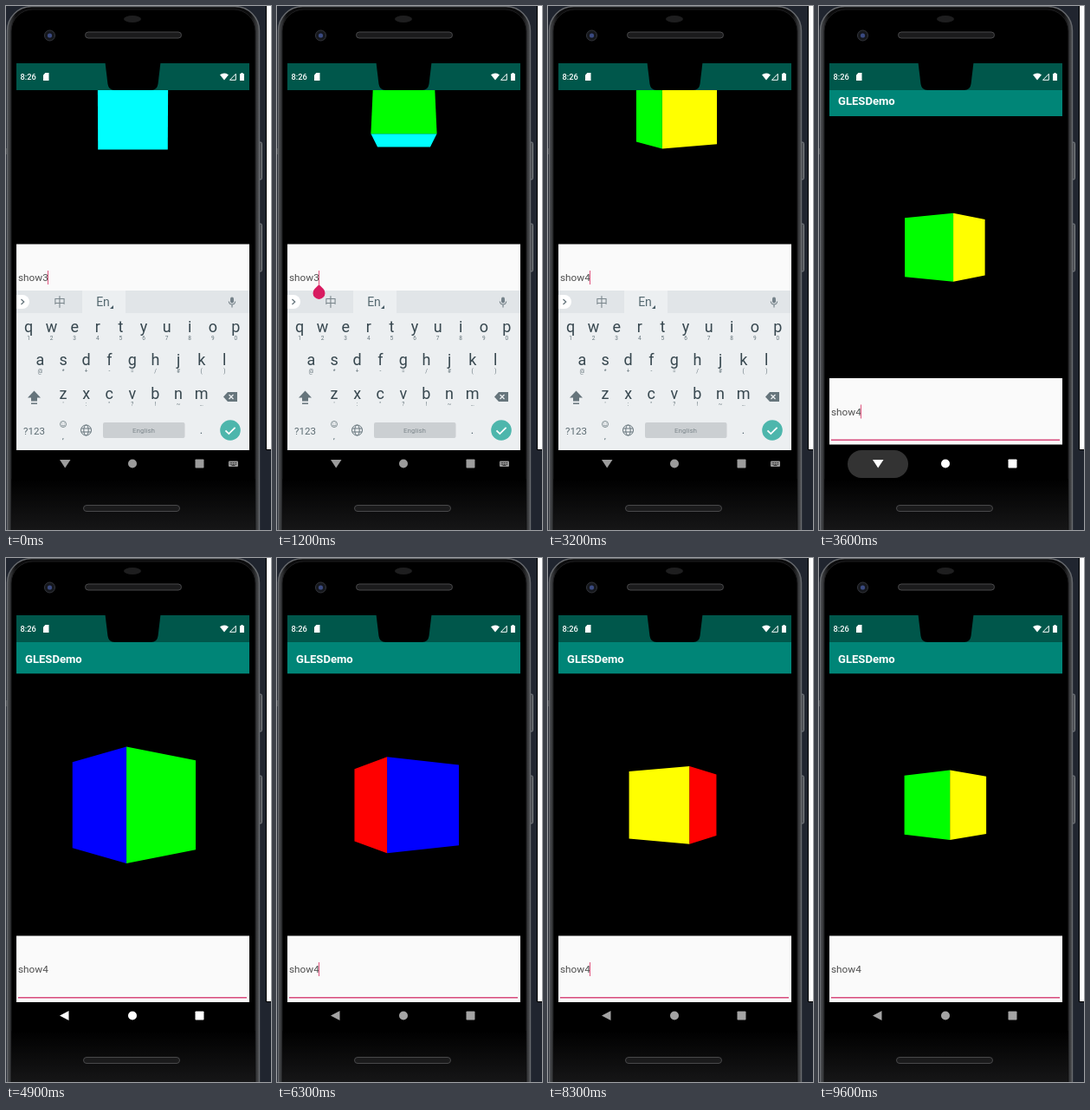
Write an HTML page that moves like this. It is 306x604 px and loops after 9.7 s.

```html
<!DOCTYPE html>
<html lang="en">
<head>
<meta charset="utf-8">
<title>Rotating cube</title>
<style>
  html, body { margin: 0; width: 100%; height: 100%; overflow: hidden; background: #20252f; }
  svg { display: block; width: 306px; height: 604px; }
  text { font-family: Roboto, "Noto Sans", sans-serif; }
  .mid { text-anchor: middle; }
  .cjk { font-family: "Noto Sans CJK SC", "Noto Sans CJK", sans-serif; }
</style>
</head>
<body>
<svg viewBox="0 0 306 604" xmlns="http://www.w3.org/2000/svg">
  <defs>
    <clipPath id="area"><rect x="12" y="97" width="269" height="415"/></clipPath>
    <clipPath id="gl"><rect x="12" y="133.500" width="269" height="302"/></clipPath>
    <linearGradient id="rim">
      <stop offset="0" stop-color="#4c4e51"/>
      <stop offset=".035" stop-color="#0c0c0d"/>
      <stop offset=".965" stop-color="#0c0c0d"/>
      <stop offset="1" stop-color="#4c4e51"/>
    </linearGradient>
    <linearGradient id="base" x2="0" y2="1">
      <stop offset="0" stop-color="#000"/>
      <stop offset="1" stop-color="#161617"/>
    </linearGradient>
  </defs>

  <!-- phone body -->
  <rect width="306" height="604" fill="#20252f"/>
  <rect x="300" width="6" height="512" fill="#000"/>
  <rect x="301" width="5" height="511" fill="#fff"/>
  <g fill="#4b4e53" stroke="#85888d" stroke-width=".9">
    <rect x="290" y="157" width="5.500" height="43" rx="1.500"/>
    <rect x="290" y="251" width="5.500" height="55" rx="1.500"/>
  </g>
  <rect x="0" y="164" width="2" height="7" fill="#4b4e53"/>
  <rect x="1.500" y=".5" width="291" height="640" rx="28" fill="url(#rim)" stroke="#66696d" stroke-width="1.400"/>
  <rect x="6" y="4" width="282" height="640" rx="25" fill="#000" stroke="#1d1d1f"/>
  <rect x="6.500" y="545" width="281" height="59" fill="url(#base)"/>
  <ellipse cx="146" cy="15" rx="10" ry="4" fill="#1e1e1f"/>
  <circle cx="50.500" cy="34" r="6" fill="#15171c" stroke="#34363c"/>
  <circle cx="50.500" cy="34" r="2.600" fill="#3a4a80"/>
  <g fill="#1b1b1c" stroke="#48484a">
    <rect x="91.500" y="30" width="111" height="7" rx="3.500"/>
    <rect x="89.500" y="575.500" width="111" height="7" rx="3.500"/>
  </g>
  <rect x="12" y="512" width="269" height="33" fill="#000"/>

  <!-- app window -->
  <g clip-path="url(#area)">
    <g id="app">
      <rect x="12" y="60" width="269" height="73.500" fill="#008577"/>
      <text x="22" y="120.500" font-size="13.100" font-weight="700" fill="#fff">GLESDemo</text>
      <rect x="12" y="133.500" width="269" height="303" fill="#000"/>
      <g id="cube" clip-path="url(#gl)"></g>
      <rect x="12" y="435.500" width="269" height="76.500" fill="#fafafa"/>
      <rect x="14" y="506" width="264" height="1.500" fill="#d84a7c"/>
      <text id="entry" x="14" y="478" font-size="11.800" fill="#4e4e4e"></text>
      <rect id="caret" x="48" y="466" width="1" height="16" fill="#e0557f"/>
    </g>
    <g id="keys"></g>
    <path id="handle" d="M48.500 321l5 5a7 7 0 1 1-10 0z" fill="#d81b60"/>
  </g>

  <!-- status bar -->
  <rect x="12" y="66" width="269" height="31" fill="#00574b"/>
  <path d="M114.500 65H178.500L175.500 90Q174.500 97 167.500 97H125.500Q118.500 97 117.500 90Z" fill="#000"/>
  <g fill="#fff">
    <text x="16.500" y="84.800" font-size="9.300" font-weight="500">8:26</text>
    <path d="M45.500 77H49.500V86H43V79.500Z"/>
    <path d="M247 79.300Q252 75.500 257 79.300L252 85.500Z"/>
    <path d="M270 78h1.500v-1h2v1h1.500v8h-5z"/>
  </g>
  <path d="M258.500 85.300H265.300V78.300Z" fill="none" stroke="#fff" stroke-width="1"/>

  <!-- navigation bar -->
  <rect id="pill" x="33" y="512" width="70" height="32" rx="16" fill="#333"/>
  <g id="nav">
    <path id="back"/>
    <circle cx="146" cy="527.500" r="5"/>
    <rect x="218.500" y="522.500" width="10" height="10" rx=".8"/>
  </g>
  <g id="imeIcon" fill="#9c9c9c">
    <rect x="257" y="524.500" width="11" height="6.500" rx="1"/>
    <path d="M258.500 526.500h8M258.500 528.300h8" stroke="#000" stroke-width=".8" stroke-dasharray="1 .7"/>
    <path d="M260.500 529.600h4" stroke="#000" stroke-width=".7"/>
  </g>
</svg>
<script>
const LOOP = 9700, STEP = 100, PAN = 161;
const CX = 146.5, CY = 284.8, FOCAL = 285;
const $ = id => document.getElementById(id);

// seconds, value
const depthX = [[0, 8.04], [1.49, 8.93], [1.5, 5.2], [2.7, 5.9]];
const depthY = [[2.7, 8.1], [4.19, 8.95], [4.2, 5.23], [4.9, 5.65], [6.3, 6.5], [8.3, 7.72], [9.6, 8.5]];
const turnX = [[0, 2], [2.3, 133.7], [2.7, 157]];
const turnY = [[2.7, 0.8], [3.6, 53.8], [4.9, 130.5], [6.3, 210.7], [8.3, 330.5], [9.6, 409.7]];
const panKeys = [[3.3, PAN], [3.4, 130], [3.5, 48], [3.6, 6.5], [3.7, 0]];
const ringX = ['#0ff', '#0f0', '#f0f', '#f00'];
const ringY = ['#ff0', '#0f0', '#00f', '#f00'];

function sample(keys, t) {
  if (t <= keys[0][0]) return keys[0][1];
  for (let i = 1; i < keys.length; i++) {
    const [t0, a] = keys[i - 1], [t1, b] = keys[i];
    if (t <= t1) return a + (b - a) * (t - t0) / (t1 - t0);
  }
  return keys[keys.length - 1][1];
}

// Corner of the ring: offset along the turn and half size across it
function corner(deg, depth) {
  const a = deg * Math.PI / 180;
  const scale = FOCAL / (depth - Math.SQRT2 * Math.cos(a));
  return [Math.SQRT2 * Math.sin(a) * scale, scale];
}

function cube(turn, depth, colors, vertical) {
  return colors.map((color, k) => {
    const mid = turn - 90 * k;
    if (depth * Math.cos(mid * Math.PI / 180) <= 1) return '';
    const [u, p] = corner(mid - 45, depth), [v, q] = corner(mid + 45, depth);
    const points = [[u, -p], [v, -q], [v, q], [u, p]]
      .map(([a, b]) => vertical ? [CX + b, CY + a] : [CX + a, CY + b])
      .map(xy => xy.map(n => n.toFixed(2)).join());
    return `<polygon points="${points.join(' ')}" fill="${color}"/>`;
  }).join('');
}

function label(x, y, size, str, fill = '#455a64', cls = 'mid') {
  return `<text class="${cls}" x="${x}" y="${y}" font-size="${size}" fill="${fill}">${str}</text>`;
}

function keyRow(letters, hints, x, y) {
  return [...letters].map((ch, i) => {
    const cx = x + i * 26.6;
    return label(cx, y, 18, ch, '#37474f') + label(cx, y + 8.5, 6.5, hints[i], '#66757c');
  }).join('');
}

function keyboard() {
  const line = 'fill="none" stroke="#66757c"';
  return `
    <rect x="12" y="328" width="269" height="184" fill="#eceff1"/>
    <rect x="12" y="328" width="269" height="26" fill="#e1e5e8"/>
    <rect x="88" y="328" width="50" height="26" fill="#eceff1"/>
    <path d="M12 333h7a8 8 0 0 1 0 16h-7z" fill="#fff"/>
    <path d="M17.500 338l3.200 3-3.200 3" ${line} stroke-width="1.300"/>
    ${label(62, 346, 14, '中', '#7b878d', 'mid cjk')}
    ${label(112, 346, 14, 'En', '#546870')}
    <path d="M124 345v4h-4z" fill="#455a64"/>
    <rect x="259" y="335.500" width="4" height="7" rx="2" fill="#75828a"/>
    <path d="M257.300 340.500a3.700 3.700 0 0 0 7.400 0M261 344.500v3" ${line}/>
    ${keyRow('qwertyuiop', '1234567890', 26, 376)}
    ${keyRow('asdfghjkl', '@*+-=/#()', 39.500, 414)}
    ${keyRow('zxcvbnm', `':"?!~…`, 66, 452.500)}
    <path d="M32.500 443.500l7.500 8h-4v4h-7v-4h-4zM29 457.500h7v1.500h-7z" fill="#66757c"/>
    <path d="M256 445h11v11h-11l-5-5.500z" fill="#66757c"/>
    <path d="M257.500 448l5 5m0-5l-5 5" stroke="#eceff1" stroke-width="1.300"/>
    ${label(32.500, 493.500, 11.500, '?123', '#5c6b72')}
    <circle cx="66" cy="482" r="3.500" ${line} stroke-width=".8"/>
    <path d="M64 483q2 2 4 0M64.700 480.600v.8M67.300 480.600v.8" ${line} stroke-width=".7"/>
    ${label(66, 499, 9, ',')}
    <g ${line} stroke-width="1"><circle cx="92.500" cy="489" r="6"/>
      <ellipse cx="92.500" cy="489" rx="2.700" ry="6"/><path d="M87 487h11M87 491h11"/></g>
    <rect x="112" y="480" width="94.500" height="18" rx="2" fill="#cbcfd2"/>
    ${label(159, 492, 8, 'English', '#7f898e')}
    ${label(225.500, 493, 13, '.')}
    <circle id="enter" cx="259" cy="489" r="11.800" fill="#4db6ac"/>
    <path d="M253.500 489.300l3.800 3.800 7.300-7.300" fill="none" stroke="#fff" stroke-width="1.800"/>`;
}

const show = (id, on) => { $(id).style.display = on ? '' : 'none'; };

function caretOn(ms) {
  const start = ms < 1400 ? 0 : ms < 1700 ? 1400 : ms < 3100 ? 1700 : 3120;
  return ms >= start && (ms - start) % 990 < 495;
}

function draw(ms) {
  const t = ms / 1000, typing = ms < 3500;
  $('app').setAttribute('transform', `translate(0 ${-sample(panKeys, t)})`);
  $('cube').innerHTML = t < 2.7
    ? cube(sample(turnX, t), sample(depthX, t), ringX, true)
    : cube(sample(turnY, t), sample(depthY, t), ringY, false);

  const erased = ms >= 1400 && ms < 1700;
  $('entry').textContent = ms < 1400 ? 'show3' : erased ? 'show' : 'show4';
  $('caret').setAttribute('x', erased ? 41.5 : 48);
  show('caret', caretOn(ms));
  show('handle', ms >= 600 && ms < 1400);

  show('keys', typing);
  show('imeIcon', typing);
  $('enter').setAttribute('fill', ms >= 2600 && ms < 2800 ? '#3f9a92' : '#4db6ac');

  $('pill').style.opacity = ms < 3300 ? 0 : sample([[3.7, 1], [4, 0]], t);
  $('back').setAttribute('d', ms < 3700 ? 'M62 523H74.500L68.200 532.500Z' : 'M62 527.500L72.500 522V533Z');
  const shade = typing ? 156 : Math.round(sample([[5.8, 255], [6.2, 164]], t));
  $('nav').setAttribute('fill', `rgb(${shade},${shade},${shade})`);
}

$('keys').innerHTML = keyboard();
const begin = performance.now();
let last = -1;
function tick() {
  const ms = Math.floor((performance.now() - begin) % LOOP / STEP) * STEP;
  if (ms !== last) draw(last = ms);
  requestAnimationFrame(tick);
}
tick();
</script>
</body>
</html>
```
